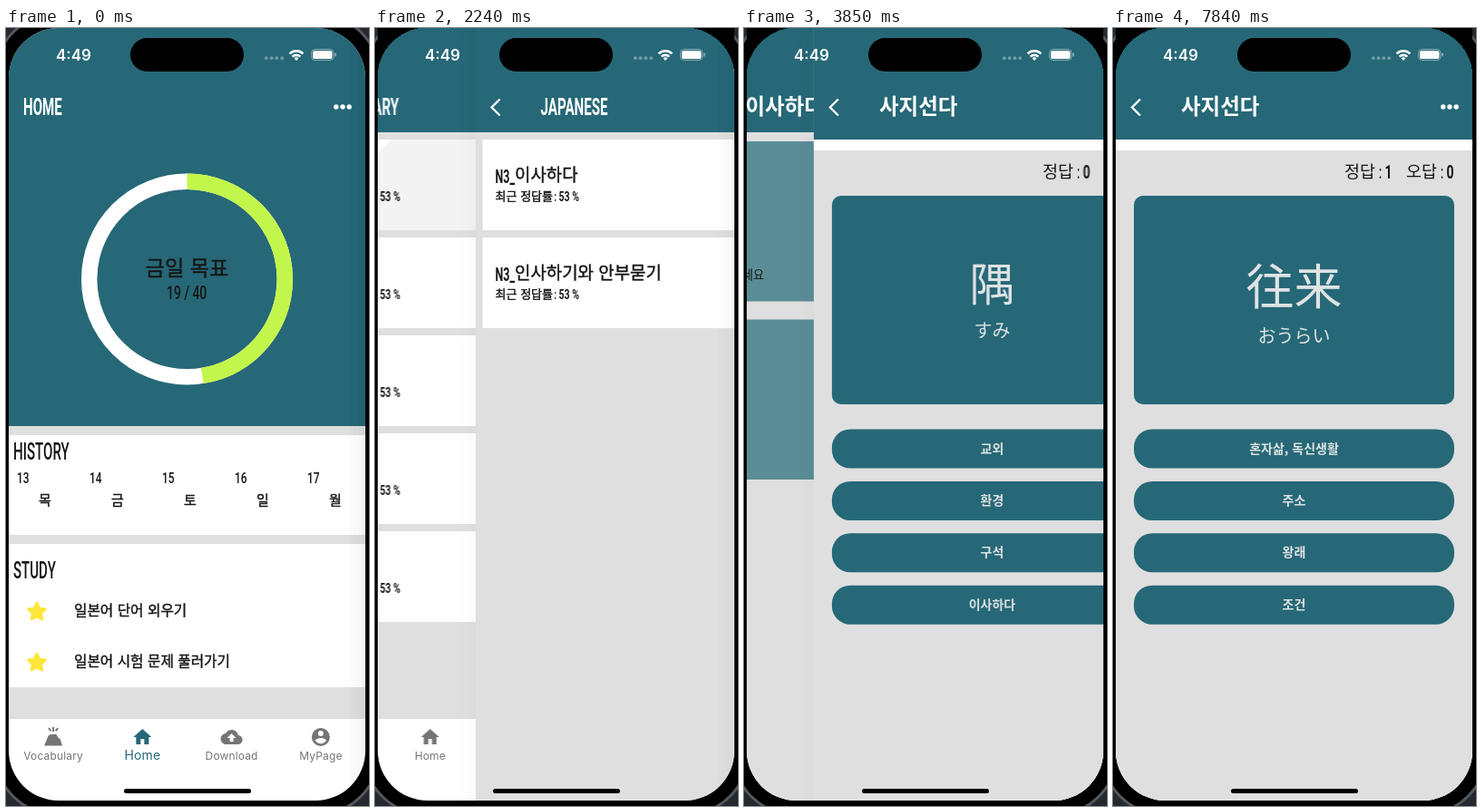
An HTML page that plays this animation: 400 px wide and 858 px high, repeating every 8 s.

```html
<!DOCTYPE html>
<html lang="ko">
<head>
<meta charset="utf-8">
<title>Vocabulary app</title>
<style>
html, body { margin: 0; height: 100%; overflow: hidden; background: #23292f; }
svg { display: block; width: 100vw; height: 100vh; }
text { font-family: "Noto Sans CJK KR", "Noto Sans CJK JP", "Noto Sans CJK", sans-serif; fill: #161616; white-space: pre; }
.cond { font-family: Roboto, sans-serif; font-weight: 500; }
.ui { font-family: Inter, sans-serif; }
.b { font-weight: 700; }
.med { stroke: #161616; stroke-width: .4px; }
.mid { text-anchor: middle; }
.w { fill: #fff; }
.soft { fill: #dfe3e4; }
.nav text { fill: inherit; letter-spacing: .15px; }
.anim { animation: 8s linear infinite; }
</style>
</head>
<body>
<script>
const TEAL = '#266877', GREY = '#dfdfdf', GREEN = '#4caf50', OFF = '#757575', LOOP = 8000;
const NARROW = .58, DIGIT = .7;   // letter and figure width of the condensed face

// ---- drawing helpers
const rect = (x, y, w, h, fill, r = 0) => `<rect x="${x}" y="${y}" width="${w}" height="${h}" rx="${r}" fill="${fill}"/>`;
const dot = (x, y, r, fill) => `<circle cx="${x}" cy="${y}" r="${r}" fill="${fill}"/>`;
const text = (x, y, size, s, cls = '') => `<text x="${x}" y="${y}" font-size="${size}" class="${cls}">${s}</text>`;
const ko = (x, cy, size, s, cls = '') => text(x, cy + size * .37, size, s, cls);
const cond = (x, y, size, s, cls = '', k = NARROW) =>
  `<g transform="translate(${x} ${y}) scale(${k} 1)">${text(0, 0, size, s, 'cond ' + cls)}</g>`;
const at = (x, y, body, s = 1) => `<g transform="translate(${x} ${y}) scale(${s})">${body}</g>`;
const anim = (name, body, extra = '') => `<g class="anim" style="animation-name:${name};${extra}">${body}</g>`;
const range = (n, f) => Array.from({ length: n }, (_, i) => f(i)).join('');

// ---- keyframe helpers
const pc = ms => (ms / LOOP * 100).toFixed(3) + '%';
const tween = (name, a, b, from, to, ease = 'linear') =>
  `@keyframes ${name}{0%,${pc(a)}{${from};animation-timing-function:${ease}}${pc(b)},100%{${to}}}`;
const cut = (name, ms, from, to) => tween(name, ms, ms + 1, `opacity:${from}`, `opacity:${to}`);
const push = (n, start, dur) => `
  @keyframes in${n}{
    0%,${pc(start)}{transform:translateX(393px);animation-timing-function:cubic-bezier(.283,.044,.545,.57)}
    ${pc(start + dur * .198)}{transform:translateX(180.4px);animation-timing-function:cubic-bezier(.209,1,.4345,.976)}
    ${pc(start + dur)},100%{transform:none}}`
  + tween('out' + n, start, start + dur, 'transform:translateX(0px)', 'transform:translateX(-131px)', 'cubic-bezier(.35,.91,.33,.97)');
const splash = (name, a, b, c, s0, s1, s2, o) => `
  @keyframes ${name}{
    0%,${pc(a)}{transform:scale(0);opacity:0}
    ${pc(a + 1)}{transform:scale(${s0});opacity:.08}
    ${pc(b)}{transform:scale(${s1});opacity:${o}}
    ${pc(c)},100%{transform:scale(${s2});opacity:0}}`;

document.head.appendChild(document.createElement('style')).textContent =
  cut('hideHome', 1044, 1, 0) + cut('showVoc', 1044, 0, 1) +
  cut('hideQ', 5874, 1, 0) + cut('showQ', 5874, 0, 1) +
  tween('tabOn', 1030, 1230, `fill:${OFF}`, `fill:${TEAL}`) +
  tween('tabOff', 1030, 1230, `fill:${TEAL}`, `fill:${OFF}`) +
  tween('grow', 1030, 1230, 'transform:scale(1)', 'transform:scale(1.167)') +
  tween('shrink', 1030, 1230, 'transform:scale(1.167)', 'transform:scale(1)') +
  splash('tapTab', 1035, 1120, 1270, .4, 1, 1.3, .08) +
  splash('tapList', 2085, 2240, 2460, .2, 1, 1.8, .05) +
  splash('tapItem', 2925, 3080, 3340, .4, 1, 2.2, .075) +
  push(1, 2101, 500) + push(2, 3025, 500) + push(3, 3712, 414);

// ---- shared parts
const more = range(3, i => dot(363.8 + i * 7.2, 87, 2.7, '#fff'));
const back = '<path d="M30 78.5 21 87.5 30 96.5" fill="none" stroke="#fff" stroke-width="2.4"/>';
const header = (title, h = 115) => rect(3, 0, 540, h, TEAL) + title + more;
const ripple = (name, x, y, r, clip) =>
  `<g clip-path="url(#${clip})">${at(x, y, anim(name, dot(0, 0, r, '#000')))}</g>`;
const page = (n, body) =>
  anim('in' + n, rect(-17, 0, 20, 858, 'url(#edge)') + anim('out' + (n + 1), rect(3, 0, 540, 858, GREY) + body));
const rate = (x, y) => ko(x, y, 13, '최근 정답률', 'med') +
  cond(x + 65, y + 5.5, 15, ':', 'b') + cond(x + 70, y + 5.5, 15, '53 %', 'b', DIGIT);

// ---- home
const star = y => {
  let p = '';
  for (let i = 0; i < 10; i++) {
    const r = i % 2 ? 4.7 : 9.8, a = i * Math.PI / 5;
    p += `${(34 + r * Math.sin(a)).toFixed(2)},${(y - r * Math.cos(a)).toFixed(2)} `;
  }
  return `<polygon points="${p}" fill="#ffe63b" stroke="#ffe63b" stroke-width="3" stroke-linejoin="round"/>`;
};
const ring = (color, part) => `<circle cx="199.5" cy="277" r="107.8" fill="none" stroke="${color}" stroke-width="17.4"
  pathLength="40" stroke-dasharray="${part} 40" transform="rotate(-90 199.5 277)"/>`;
const home = rect(3, 0, 540, 439, TEAL) + cond(19, 96, 26, 'HOME', 'w b') + more +
  ring('#fff', 40) + ring('#c3f64a', 19) +
  ko(199.5, 264, 23.2, '금일 목표', 'mid med') + cond(177, 299, 20, '19 / 40', '', DIGIT) +
  rect(3, 449, 540, 110, '#fff') + cond(8, 476, 26, 'HISTORY') +
  [...'목금토일월'].map((d, i) => cond(12 + i * 80, 502, 17, 13 + i, '', DIGIT) + ko(36 + i * 80, 520, 15, d, 'med')).join('') +
  rect(3, 569, 540, 158, '#fff') + cond(8, 607, 26, 'STUDY') +
  star(644) + ko(75, 642, 15.7, '일본어 단어 외우기', 'med') +
  star(700) + ko(75, 698, 15.7, '일본어 시험 문제 풀러가기', 'med');

// ---- vocabulary list
const langs = ['JAPANESE', 'ENGLISH', 'ESPAÑOL', 'FRANÇAIS', 'KOREAN'];
const kebab = y => [-7, 0, 7].map(d => dot(373, y + d, 2.6, '#1a1a1a')).join('');
const vocab = rect(3, 0, 540, 762, GREY) + header(cond(19, 96, 26, 'VOCABULARY', 'w b')) +
  langs.map((s, i) => {
    const y = 123 + i * 108;
    return rect(11, y, 377, 100, '#fff') + cond(25, y + 48, 20, s, 'b') + rate(25, y + 62) + kebab(y + 50);
  }).join('') + ripple('tapList', 164, 195, 91, 'row');

// ---- bottom tabs
const hill = '<path d="M2 21.5 6.5 10.5 9 9h6.5l2 4 2 1 2.5 7.5zM11 6V1h2v5zM6.2 2.6 7.6 1.4l2.6 3.4-1.5 1.2zM17.8 2.6 16.4 1.4l-2.6 3.4 1.5 1.2z"/>';
const house = '<path d="M10 20v-6h4v6h5v-8h3L12 3 2 12h3v8z"/>';
const cloud = '<path d="M19.35 10.04C18.67 6.59 15.64 4 12 4 9.11 4 6.6 5.64 5.35 8.04 2.34 8.36 0 10.91 0 14c0 3.31 2.69 6 6 6h13c2.76 0 5-2.24 5-5 0-2.64-2.05-4.78-4.65-4.96zM14 13v4h-4v-4H7l5-5 5 5z"/>';
const person = '<path d="M12 2a10 10 0 100 20 10 10 0 000-20zm0 3a3 3 0 110 6 3 3 0 010-6zm0 14.2c-2.5 0-4.71-1.28-6-3.22.03-1.99 4-3.08 6-3.08s5.97 1.09 6 3.08c-1.29 1.94-3.5 3.22-6 3.22z"/>';
const tab = (i, icon, label, color, size) => {
  const x = 52.1 + i * 98.25;
  return anim(color, at(x - 12, 770, icon) + at(x, 807, anim(size, text(0, 0, 12, label, 'ui mid'))), `fill:${OFF}`);
};
const tabs = rect(3, 762, 540, 96, '#fff') + ripple('tapTab', 52, 790, 35, 'bar') +
  `<g class="nav">${tab(0, hill, 'Vocabulary', 'tabOn', 'grow')}${tab(1, house, 'Home', 'tabOff', 'shrink')}` +
  tab(2, cloud, 'Download', 'none', 'none') + tab(3, person, 'MyPage', 'none', 'none') + '</g>';

// ---- lessons of one language
const lessons = header(back + cond(75, 96, 26, 'JAPANESE', 'w b')) +
  ['이사하다', '인사하기와 안부묻기'].map((s, i) => {
    const y = 123 + i * 108;
    return rect(11, y, 377, 100, '#fff') + cond(25, y + 48, 20, 'N3_', 'b', .62) +
      ko(46.5, y + 39.5, 18.9, s, 'med') + rate(25, y + 62) + kebab(y + 50);
  }).join('') + ripple('tapItem', 142, 181, 46, 'row');

// ---- study modes
const tile = (x, y) => rect(x, y, 176.5, 176.5, '#5b8d96', 10);
const mode = (y, name, a, b) => ko(23, y + 89, 16.9, name, 'w b') + ko(23, y + 129, 13.2, a) + ko(23, y + 147, 13.2, b);
const arrows = fill => `<path d="M15.5 5H11l5 7-5 7h4.5l5-7zM8.5 5H4l5 7-5 7h4.5l5-7z" fill="${fill}"/>`;
const four = range(4, i => {
  const x = 33 + i % 2 * 20, y = 155 + (i >> 1) * 19.6, green = i % 3 === 0;
  return (green ? dot(x + 1.2, y + 1.2, 8.4, '#3e8352') : '') + dot(x, y, 8.4, green ? GREEN : '#fff');
});
const modes = header(back + cond(75, 96, 26, 'N3_', 'w b') + ko(103, 86.5, 23.5, '이사하다', 'w b')) +
  range(4, i => tile(13 + i % 2 * 196.5, 125 + (i >> 1) * 196.5)) +
  four + mode(125, '사지선다', '문제를 읽고', '정답을 선택하세요') +
  at(26.6, 343.2, arrows('#3e8352'), 1.62) + at(25.4, 342, arrows(GREEN), 1.62) +
  mode(321.5, '깜빡이', '보고만 있거나', '듣고만있거나');

// ---- quiz
const question = (word, cy, size, kana, ky, score, answers) =>
  ko(199.5, cy, size, word, 'mid soft') + ko(199.5, ky, 20, kana, 'mid soft') +
  cond(299.5, 166, 20, score, 'b', DIGIT) +
  answers.map((s, i) => ko(199.5, 463.5 + i * 57.4, 14, s, 'mid b soft')).join('');
const quiz = header(back + ko(75, 86.5, 23.5, '사지선다', 'w b'), 123) + rect(3, 123, 540, 12, '#fff') +
  ko(255, 158.5, 18.5, '정답') + cond(293, 166, 20, ':') +
  ko(323, 158.5, 18.5, '오답') + cond(361, 166, 20, ':') + cond(367.5, 166, 20, '0', 'b', DIGIT) +
  rect(23, 185, 353, 230, TEAL, 10) + range(4, i => rect(23, 442.5 + i * 57.4, 353, 43, TEAL, 20)) +
  anim('hideQ', question('隅', 282, 50, 'すみ', 334, '0', ['교외', '환경', '구석', '이사하다'])) +
  anim('showQ', question('往来', 285, 53, 'おうらい', 340, '1', ['혼자삶, 독신생활', '주소', '왕래', '조건']));

// ---- phone
const status = text(74.5, 35.5, 17, '4:49', 'ui mid w" font-weight="600') +
  rect(137, 11, 125, 37, '#000', 18.5) +
  range(4, i => dot(286.8 + i * 5.8, 33.2, 1.9, 'rgba(255,255,255,.35)')) +
  '<path d="M312.6 28.3a10.5 10.5 0 0 1 14.8 0M315.7 31.6a6.2 6.2 0 0 1 8.6 0" fill="none" stroke="#fff" stroke-width="2.6"/>' +
  '<path d="M317.6 33.4a3.4 3.4 0 0 1 4.8 0l-2.4 2.5z" fill="#fff"/>' +
  '<rect x="336.5" y="23.5" width="24.5" height="12" rx="4" fill="none" stroke="#fff" stroke-opacity=".45"/>' +
  rect(338, 25, 21.5, 9, '#fff', 2.6) + rect(362.3, 27.5, 1.5, 4, 'rgba(255,255,255,.5)', .7);

const clip = (id, x, y, w, h, r) => `<clipPath id="${id}">${rect(x, y, w, h, '#000', r)}</clipPath>`;
document.body.innerHTML = `<svg viewBox="0 0 400 858" xmlns="http://www.w3.org/2000/svg"><defs>
  ${clip('screen', 3, 0, 393, 852, 55)}${clip('row', 11, 123, 377, 100, 0)}${clip('bar', 3, 762, 393, 90, 0)}
  <linearGradient id="edge"><stop offset="0" stop-opacity="0"/><stop offset="1" stop-opacity=".016"/></linearGradient></defs>
  <rect x="-13" y="-16" width="425" height="884" rx="71" fill="#000" stroke="#55585b" stroke-width="3"/>
  <g clip-path="url(#screen)">
    ${anim('out1', rect(3, 0, 540, 858, GREY) + anim('hideHome', home) + anim('showVoc', vocab) + tabs)}
    ${page(1, lessons)}${page(2, modes)}${page(3, quiz)}
    ${status}${rect(130, 839, 140, 5, '#000', 2.5)}
  </g></svg>`;
</script>
</body>
</html>
```
